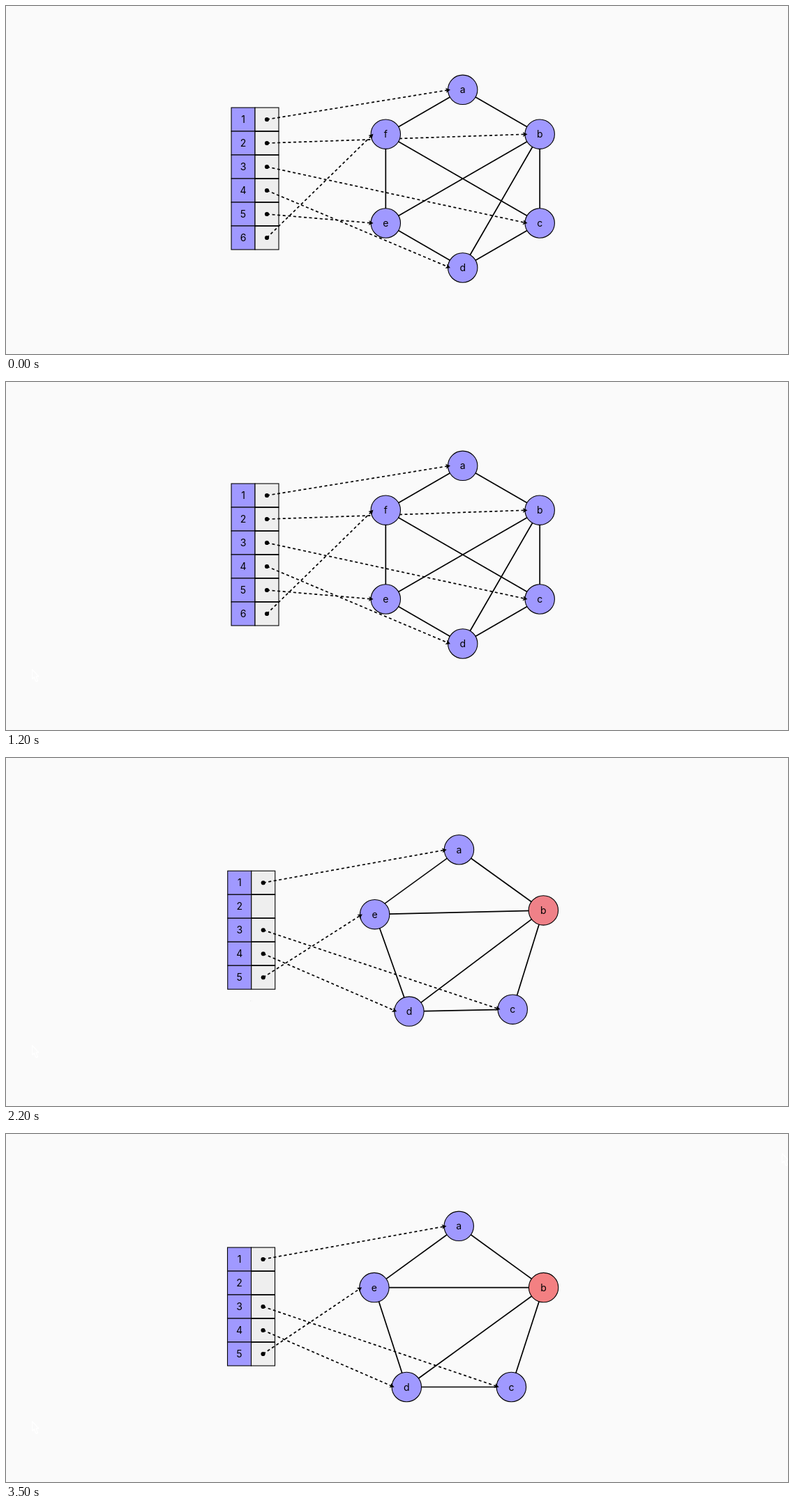
These frames come from a looping animation (1121x500 px, 4000 ms). An HTML page:

```html
<!DOCTYPE html>
<html lang="en">
<head>
<meta charset="utf-8">
<title>Removing a graph node</title>
<style>
  html, body { margin: 0; width: 100%; height: 100%; overflow: hidden; background: #fafafa; }
  svg { display: block; width: 1121px; height: 500px; }
  text { font: 14px Inter, Roboto, sans-serif; text-anchor: middle; fill: #000; stroke: none; }
</style>
</head>
<body>
<svg id="stage" viewBox="0 0 1121 500"></svg>
<script>
const LOOP = 4000, TICK = 100;
const PURPLE = [160, 153, 255], RED = [243, 128, 130];
const RADIUS = 21.2, ROW = 34;

// Start and end centre of every node.
const NODES = {
  a: [654.7, 120.3, 649.2, 132.3],
  b: [765.2, 184.2, 770.6, 220.6],
  c: [765.2, 312, 724.4, 363.5],
  d: [654.7, 376, 574.3, 363.5],
  e: [544.3, 312, 527.9, 220.6],
  f: [544.3, 184.2, 538.8, 201.2]
};
const KEPT_EDGES = ['ab', 'bc', 'be', 'bd', 'de', 'cd'];
const LOST_EDGES = ['af', 'ef', 'cf'];
const POINTERS = ['a', 'b', 'c', 'd', 'e', 'f'];

// Progress of the layout change, and the two cursor paths: time, then values.
const MORPH = [[1700, 0], [1800, .152], [1900, .47], [2000, .76], [2100, .893], [2200, .955], [2300, 1]];
const PATHS = [
  [[100, 1063, 44], [200, 970, 74], [300, 828, 116], [600, 367, 251], [800, 229, 300.5], [1100, 37.5, 413]],
  [[2400, 181, 395], [2600, 424, 301], [2800, 719, 199.5], [2900, 886, 152], [3100, 986, 114], [3200, 1036, 78], [3400, 1112.5, 28]]
];

const lerp = (a, b, p) => a + (b - a) * p;
const mix = (a, b, p) => `rgb(${a.map((v, i) => Math.round(lerp(v, b[i], p)))})`;

function sample(keys, t) {
  if (t <= keys[0][0]) return keys[0].slice(1);
  const i = keys.findIndex(k => k[0] >= t);
  if (i < 0) return keys[keys.length - 1].slice(1);
  const [from, to] = [keys[i - 1], keys[i]];
  const p = (t - from[0]) / (to[0] - from[0]);
  return from.slice(1).map((v, n) => lerp(v, to[n + 1], p));
}

const line = (x1, y1, x2, y2, extra = '') =>
  `<line x1="${x1}" y1="${y1}" x2="${x2}" y2="${y2}" stroke="#000" stroke-width="1.7" ${extra}/>`;
const label = (x, y, s) => `<text x="${x}" y="${y + 5}">${s}</text>`;
const rect = (x, y, fill) =>
  `<rect x="${x}" y="${y}" width="${ROW}" height="${ROW}" fill="${fill}" stroke="#000" stroke-width="1.1"/>`;
const group = (x, y, s, body) => s <= 0 ? '' :
  `<g transform="translate(${x} ${y}) scale(${s})" opacity="${s}">${body}</g>`;

const node = (name, fill) =>
  `<circle r="${RADIUS}" fill="${fill}" stroke="#000" stroke-width="1.1"/>${label(0, 0, name)}`;

function row(n) {
  const divider = n > 1 ? line(0, -ROW / 2, ROW, -ROW / 2) : '';
  return rect(-ROW, -ROW / 2, mix(PURPLE, PURPLE, 0)) + rect(0, -ROW / 2, '#eee') +
    divider + label(-ROW / 2, 0, n);
}

function arrowShaft(x1, y1, x2, y2) {
  return line(x1, y1, x2, y2, 'stroke-dasharray="4 3.6"') + `<circle cx="${x1}" cy="${y1}" r="3.1"/>`;
}

function arrowHead(x1, y1, x2, y2) {
  const angle = Math.atan2(y2 - y1, x2 - x1) * 180 / Math.PI;
  return `<path d="M0.5 0L-6 -3.5L-4.6 0L-6 3.5Z" transform="translate(${x2} ${y2}) rotate(${angle})"/>`;
}

// A segment drawn around its own middle, scaled and faded by s.
function scaled(draw, [x1, y1, x2, y2], s, dx, dy) {
  const w = (x2 - x1) / 2, h = (y2 - y1) / 2;
  return group(x1 + w + dx, y1 + h + dy, s, draw(-w, -h, w, h));
}

const cursor = (x, y, stroke, fill) =>
  `<path d="M0 0V13.6L3 11L5.6 17.5L8.2 16.4L5.6 10.2L9.4 10Z" transform="translate(${x} ${y})"
    fill="${fill}" stroke="${stroke}" stroke-width="1.3" stroke-linejoin="round"/>`;

function cursors(t) {
  return PATHS.map(path => {
    const end = path[path.length - 1][0];
    if (t < path[0][0]) return '';
    const [x, y] = sample(path, t);
    return t <= end ? cursor(x, y, '#000', '#fff') : cursor(x, y, '#fff', 'none');
  }).join('');
}

function scene(t) {
  const [p] = sample(MORPH, t);
  const rest = 1 - p, dx = -5.5 * p, dy = 17 * p;
  const at = name => {
    const [x1, y1, x2, y2] = NODES[name];
    return [lerp(x1, x2, p), lerp(y1, y2, p)];
  };
  const first = name => NODES[name].slice(0, 2);
  const last = name => NODES[name].slice(2);

  let cells = '', edges = '', shafts = '', heads = '', nodes = '';

  POINTERS.forEach((name, i) => {
    const y = 163 + i * ROW, lost = name === 'b' || name === 'f';
    cells += name === 'f'
      ? group(357 + dx, y + dy, rest, row(i + 1))
      : `<g transform="translate(${357 + dx} ${y + dy})">${row(i + 1)}</g>`;

    const [nx, ny] = lost ? first(name) : at(name);
    const tip = [nx - 18.2, ny];
    if (lost) {
      const span = [374, y, ...tip];
      shafts += scaled(arrowShaft, span, rest, dx, dy * .6);
      heads += scaled(arrowHead, span, rest, dx, dy * .6);
    } else {
      const span = [374 + dx, y + dy, ...tip];
      shafts += arrowShaft(...span);
      heads += arrowHead(...span);
    }
  });

  for (const [m, n] of LOST_EDGES) edges += scaled(line, [...first(m), ...first(n)], rest, dx, dy);
  edges += scaled(line, [...last('a'), ...last('e')], p, 5.5 * rest, -15 * rest);
  for (const [m, n] of KEPT_EDGES) edges += line(...at(m), ...at(n));

  for (const name of POINTERS) {
    const fill = mix(PURPLE, name === 'b' ? RED : PURPLE, p);
    nodes += name === 'f'
      ? group(...at(name), rest, node(name, fill))
      : `<g transform="translate(${at(name)})">${node(name, fill)}</g>`;
  }
  return cells + edges + shafts + nodes + heads + cursors(t);
}

const stage = document.getElementById('stage');
const start = performance.now();
let shown = -1;

function play() {
  const tick = Math.floor((performance.now() - start) % LOOP / TICK);
  if (tick !== shown) {
    stage.innerHTML = scene(tick * TICK);
    shown = tick;
  }
  requestAnimationFrame(play);
}
play();
</script>
</body>
</html>
```
